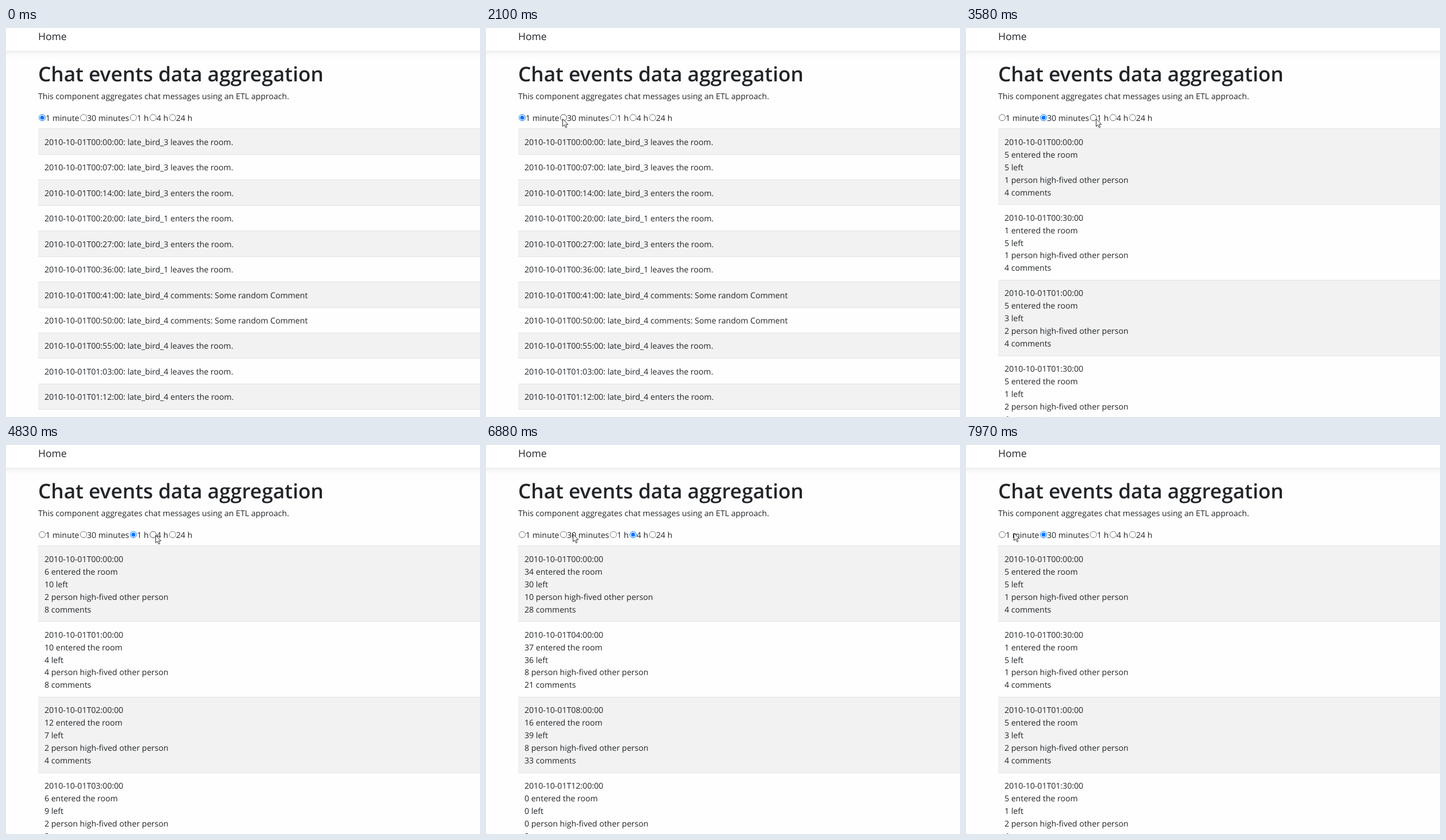
Recreate the animation shown at these times as an HTML page. Size 825 by 678 pixels, loop 8000 ms.

```html
<!DOCTYPE html>
<html lang="en">
<head>
<meta charset="utf-8">
<title>Chat events data aggregation</title>
<style>
  html, body { margin: 0; width: 100%; height: 100%; overflow: hidden; background: #fefefe; }
  svg { display: block; }
  text {
    font: 14.08px "Open Sans", "Noto Sans", sans-serif;
    fill: #212529;
    text-rendering: geometricPrecision;
    white-space: pre;
  }
  .brand { font-size: 17.5px; }
  .title { font-size: 35.2px; font-weight: 600; }
  .radio { --c: #767676; }
  .radio.hover { --c: #4f4f4f; }
  .radio.on { --c: #0075ff; }
  .radio.on.hover { --c: #005cc8; }
  .ring { fill: #fff; stroke: var(--c); stroke-width: 1; }
  .dot { fill: none; }
  .on .dot { fill: var(--c); }
</style>
</head>
<body>
<svg id="stage" width="825" height="678" viewBox="0 0 825 678">
  <defs>
    <linearGradient id="shade" x2="0" y2="1">
      <stop offset="0" stop-opacity=".045"/>
      <stop offset=".5" stop-opacity=".014"/>
      <stop offset="1" stop-opacity="0"/>
    </linearGradient>
  </defs>
  <rect width="825" height="40" fill="#fff"/>
  <rect y="40" width="825" height="1" fill="#e2e5e8"/>
  <rect y="41" width="825" height="13" fill="url(#shade)"/>
  <text class="brand" x="56" y="21">Home</text>
  <text class="title" x="56" y="93">Chat events data aggregation</text>
  <text x="56" y="124">This component aggregates chat messages using an ETL approach.</text>
  <g id="radios"></g>
  <g id="views"></g>
  <g id="pointer">
    <circle id="click" r="11" fill="#ff0" fill-opacity=".47"/>
    <path d="M.5 .5V13.6L3.5 10.9L5.6 15.7L7.8 14.8L5.7 10.1H9.8Z"
          fill="#fff" stroke="#222" stroke-width=".95" stroke-linejoin="round"/>
  </g>
</svg>
<script>
const LOOP = 8000, TICK = 80;
const TOP = 175.9, LINE = 21.93;
const $ = id => document.getElementById(id);

function add(parent, tag, attrs, content = '') {
  const el = document.createElementNS('http://www.w3.org/2000/svg', tag);
  for (const key in attrs) el.setAttribute(key, attrs[key]);
  el.textContent = content;
  return parent.appendChild(el);
}

const pad = n => String(n).padStart(2, '0');
const stamp = min => `2010-10-01T${pad(Math.floor(min / 60))}:${pad(min % 60)}:00`;

// Radio buttons: centre, label position, label
const radios = [
  [63, 69, '1 minute'], [135, 141, '30 minutes'], [221.7, 228, '1 h'],
  [256, 262, '4 h'], [290, 296, '24 h']
].map(([cx, x, label]) => {
  const el = add($('radios'), 'g', { class: 'radio' });
  add(el, 'circle', { class: 'ring', cx, cy: 156.2, r: 5.5 });
  add(el, 'circle', { class: 'dot', cx, cy: 156.2, r: 3.5 });
  add($('radios'), 'text', { x, y: 162 }, label);
  return { cx, el };
});

// A striped list; every row is an array of text lines
function list(rows, height) {
  const view = add($('views'), 'g', {});
  rows.forEach((lines, i) => {
    const y = Math.floor(TOP + i * height);
    const h = Math.floor(TOP + (i + 1) * height) - y;
    if (i % 2 === 0) add(view, 'rect', { x: 56, y, width: 769, height: h, fill: '#f2f2f2' });
    add(view, 'rect', { x: 56, y, width: 769, height: 1, fill: '#dee2e6' });
    lines.forEach((s, j) =>
      add(view, 'text', { x: 67, y: (TOP + 27.9 + i * height + j * LINE).toFixed(1) }, s));
  });
  const end = Math.floor(TOP + rows.length * height);
  add(view, 'rect', { x: 56, y: end, width: 769, height: 1, fill: '#dee2e6' });
  return view;
}

const deeds = {
  L: 'leaves the room.', E: 'enters the room.', C: 'comments: Some random Comment'
};
const events = [
  [0, '3L'], [7, '3L'], [14, '3E'], [20, '1E'], [27, '3E'], [36, '1L'],
  [41, '4C'], [50, '4C'], [55, '4L'], [63, '4L'], [72, '4E']
];
const minuteRows = events.map(([min, [user, deed]]) =>
  [`${stamp(min)}: late_bird_${user} ${deeds[deed]}`]);

const groupRows = (step, counts) => counts.map(([entered, left, fives, comments], i) => [
  stamp(i * step),
  `${entered} entered the room`,
  `${left} left`,
  `${fives} person high-fived other person`,
  `${comments} comments`
]);

const views = [
  list(minuteRows, 44.45),
  list(groupRows(30, [[5, 5, 1, 4], [1, 5, 1, 4], [5, 3, 2, 4], [5, 1, 2, 4]]), 131.8),
  list(groupRows(60, [[6, 10, 2, 8], [10, 4, 4, 8], [12, 7, 2, 4], [6, 9, 2, 8]]), 131.8),
  list(groupRows(240, [[34, 30, 10, 28], [37, 36, 8, 21], [16, 39, 8, 33], [0, 0, 0, 0]]), 131.8)
];

// Clicks: press, release, radio change, list change, choice
const clicks = [
  [2010, 2100, 2320, 2320, 1],
  [3810, 3880, 3880, 4200, 2],
  [5140, 5220, 5220, 5380, 3],
  [7190, 7270, 7270, 7350, 1]
];

// Pointer moves: start, steps, from, to, sag, easing
const smooth = p => p * p * (3 - 2 * p);
const settle = p => 1 - (1 - p) ** 2;
const linear = p => p;
const moves = [
  [510, 5, [732, 482], [532, 247], 0, settle],
  [1060, 7, [532, 247], [129, 158], 0, settle],
  [1770, 2, [129, 158], [133, 158], 0, linear],
  [3100, 7, [133, 158], [226, 157.5], 2, smooth],
  [4510, 5, [226, 157.5], [260, 156.5], 0, smooth],
  [5610, 3, [260, 156.5], [275, 156], 0, smooth],
  [6240, 7, [275, 156], [158, 155], 3.5, smooth],
  [6880, 3, [158, 155], [135.5, 154], 0, linear],
  [7660, 5, [135.5, 154], [77, 152.5], 0, smooth]
];

function pointerAt(t) {
  const move = moves.filter(m => m[0] <= t).pop();
  if (!move) return null;
  const [start, steps, a, b, sag, ease] = move;
  const p = Math.min(1, (Math.floor((t - start) / TICK) + 1) / steps);
  const k = ease(p);
  return [a[0] + (b[0] - a[0]) * k, a[1] + (b[1] - a[1]) * k + sag * Math.sin(Math.PI * p)];
}

const show = (el, on) => el.setAttribute('visibility', on ? 'visible' : 'hidden');
const choiceAt = (t, col) => clicks.reduce((now, c) => t >= c[col] ? c[4] : now, 0);

function draw(t) {
  const tip = pointerAt(t);
  const checked = choiceAt(t, 2), shown = choiceAt(t, 3);
  views.forEach((v, i) => show(v, i === shown));
  radios.forEach(({ cx, el }, i) => {
    el.classList.toggle('on', i === checked);
    el.classList.toggle('hover', !!tip && Math.hypot(tip[0] - cx, tip[1] - 156.2) < 6.6);
  });
  show($('pointer'), tip);
  if (tip) $('pointer').setAttribute('transform', `translate(${tip.map(Math.round)})`);
  show($('click'), clicks.some(c => t >= c[0] && t < c[1]));
}

const begin = performance.now();
function frame() {
  draw((performance.now() - begin) % LOOP);
  requestAnimationFrame(frame);
}
frame();
</script>
</body>
</html>
```
